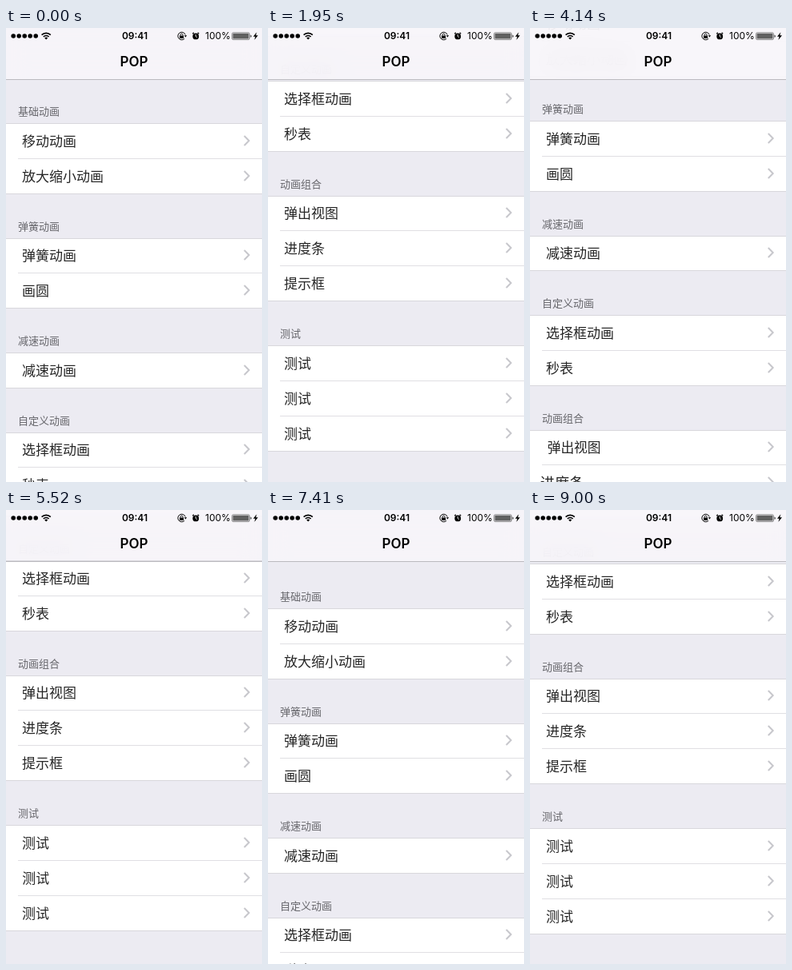
Animation, 320 px wide and 568 px high, one loop 9.03 s. Source, as an HTML page:

```html
<!DOCTYPE html>
<html lang="zh-CN">
<head>
<meta charset="utf-8">
<title>POP</title>
<style>
  html, body { margin: 0; width: 100%; height: 100%; overflow: hidden; background: #ecebf2; }
  #stage { position: relative; width: 320px; height: 568px; overflow: hidden; background: #ecebf2;
    font-family: "Noto Sans CJK SC DemiLight", "Noto Sans CJK SC Light", "Noto Sans CJK SC", "Noto Sans CJK", sans-serif; }
  #list { position: absolute; left: 0; top: 0; width: 320px; padding-top: 63.75px; }
  .head { position: relative; height: 55.5px; }
  .head span { position: absolute; left: 15px; bottom: 5.2px; font-size: 13px; line-height: 20px;
    font-weight: 350; color: #66666b; white-space: nowrap; }
  .group { position: relative; background: #fff; }
  .group::before { content: ""; position: absolute; z-index: 1; left: 0; top: 0; width: 100%;
    height: 1px; background: #d8d7dc; }
  .row { position: relative; height: 44px; }
  .row::after { content: ""; position: absolute; left: 15px; right: 0; top: 43.5px;
    height: 1px; background: #e0dfe3; }
  .row:last-child::after { left: 0; background: #d8d7dc; }
  .label { position: absolute; left: 20px; top: -.7px; width: 200px; font-size: 17px; line-height: 44px;
    font-weight: 350; color: #262626; white-space: nowrap; transform-origin: 50% 50%; }
  .row svg { position: absolute; left: 296px; top: 13.3px; }
  #bar { position: absolute; left: 0; top: 0; width: 320px; height: 64px; border-bottom: 1px solid #bbbabf;
    background: rgba(248, 246, 250, .9); -webkit-backdrop-filter: blur(14px); backdrop-filter: blur(14px); }
  #bar svg { position: absolute; left: 0; top: 0; }
  #bar text { font-family: Inter, Roboto, sans-serif; fill: #000; }
</style>
</head>
<body>
<div id="stage">
  <div id="list"></div>
  <div id="bar">
    <svg width="320" height="64" viewBox="0 0 320 64">
      <circle cx="9.2" cy="10" r="2.8"/><circle cx="16.2" cy="10" r="2.8"/><circle cx="23.2" cy="10" r="2.8"/>
      <circle cx="30.2" cy="10" r="2.8"/><circle cx="37.2" cy="10" r="2.8"/>
      <g fill="none" stroke="#000" stroke-width="1.7">
        <path d="M44.6 8.6a8 8 0 0 1 11.2 0"/>
        <path d="M46.8 11a5 5 0 0 1 6.8 0"/>
      </g>
      <path d="M48.2 12.5a3 3 0 0 1 4 0l-2 2.1z"/>
      <text x="161" y="14.3" font-size="12" font-weight="600" text-anchor="middle">09:41</text>
      <g fill="none" stroke="#000">
        <path d="M224.2 8.4A4.8 4.8 0 1 0 223 13.5"/>
        <path d="M218 9.6v-1a1.5 1.5 0 0 1 3 0v1" stroke-width=".9"/>
      </g>
      <path d="M217 9.4h5v3.5h-5zM222.6 9.2h3.6l-1.8 2.4z"/>
      <circle cx="237.2" cy="10.4" r="3.9"/>
      <path d="M233.2 7.2l1.6-1.4M241.2 7.2l-1.6-1.4" stroke="#000" stroke-width="1.2"/>
      <path d="M237.2 8v2.6l1.6 1" fill="none" stroke="#fff" stroke-width=".9"/>
      <text x="249" y="14.3" font-size="12">100%</text>
      <rect x="282.5" y="5.8" width="22" height="8.8" rx="1.6" fill="none" stroke="#777" stroke-width=".8"/>
      <rect x="283.5" y="6.8" width="20" height="6.8" rx=".6" fill="#606060"/>
      <path d="M305.4 8.6a1.6 1.6 0 0 1 0 3.2z" fill="#606060"/>
      <path d="M313.4 5.2l-4.4 5.6h2.6l-1.2 4.2 4.6-5.8h-2.7z"/>
      <text x="160" y="48.2" font-size="17" font-weight="600" text-anchor="middle">POP</text>
    </svg>
  </div>
</div>
<script>
const LOOP = 9030, STEP = 30, VIEW = 568, END = 438.5;
const sections = [
  ['基础动画', '移动动画', '放大缩小动画'],
  ['弹簧动画', '弹簧动画', '画圆'],
  ['减速动画', '减速动画'],
  ['自定义动画', '选择框动画', '秒表'],
  ['动画组合', '弹出视图', '进度条', '提示框'],
  ['测试', '测试', '测试', '测试']
];

// Each swipe: [seconds, scroll offset]; it ends at an edge and bounces there.
const swipes = [
  [[0, 0], [.35, 22], [.73, 81.5], [.87, 125.5], [.97, 169.5], [1.08, 236], [1.37, END]],
  [[2.1, END], [2.3, 400], [2.41, 351], [2.5, 307], [2.555, 207.5], [2.595, 163.5], [2.76, 8.5], [2.77, 0]],
  [[3.69, 0], [3.93, 81.5], [4.065, 125.5], [4.14, 146.5], [4.45, 205], [4.75, 250], [4.9, 300], [5.07, END]],
  [[5.97, END], [6.3, 380], [6.5, 300], [6.7, 206], [6.96, 0]],
  [[7.72, 0], [7.85, 90], [8, 260], [8.2, END]]
];

const slope = (a, b) => (b[1] - a[1]) / (b[0] - a[0]);

function tangent(pts, i) {
  if (i === 0) return 0;
  return slope(pts[i - 1], pts[Math.min(i + 1, pts.length - 1)]);
}

function scrollAt(t) {
  const pts = swipes.filter(s => s[0][0] <= t).pop();
  const last = pts.length - 1, age = t - pts[last][0];
  if (age >= 0) return pts[last][1] + tangent(pts, last) * age * Math.exp(-10 * age);
  let i = 0;
  while (pts[i + 1][0] <= t) i++;
  const [t0, y0] = pts[i], [t1, y1] = pts[i + 1];
  const h = t1 - t0, u = (t - t0) / h, v = 1 - u;
  return y0 * (1 + 2 * u) * v * v + y1 * (3 - 2 * u) * u * u
    + h * u * v * (tangent(pts, i) * v - tangent(pts, i + 1) * u);
}

// A label pops with an initial velocity whenever its row comes into view.
const pop = age => 1 + .113 * Math.exp(-5.54 * age) * Math.sin(17.65 * age);

const list = document.getElementById('list');
const rows = [];

function add(parent, cls, html = '') {
  const el = document.createElement('div');
  el.className = cls;
  el.innerHTML = html;
  return parent.appendChild(el);
}

const chevron = '<svg width="12" height="16"><path d="M1.8 2l5.9 6-5.9 6" fill="none" stroke="#c7c7cc" stroke-width="2"/></svg>';
let rowTop = 64;
for (const [title, ...names] of sections) {
  add(list, 'head', `<span>${title}</span>`);
  rowTop += 55.5;
  const group = add(list, 'group');
  for (const name of names) {
    const row = add(group, 'row', `<div class="label">${name}</div>${chevron}`);
    rows.push({ label: row.firstChild, top: rowTop, shown: [] });
    rowTop += 44;
  }
}

const visible = (row, y) => row.top - y < VIEW && row.top + 44 - y > 0;
for (const row of rows) {
  let was = visible(row, 0);
  for (let ms = 0; ms < LOOP; ms += 5) {
    const now = visible(row, scrollAt(ms / 1000));
    if (now && !was) row.shown.push(ms / 1000);
    was = now;
  }
}

function draw() {
  const t = Math.floor(performance.now() % LOOP / STEP) * STEP / 1000;
  list.style.top = -Math.round(scrollAt(t) * 2) / 2 + 'px';
  for (const { label, shown } of rows) {
    const start = shown.filter(s => s <= t).pop();
    const scale = start === undefined ? 1 : pop(t - start);
    label.style.transform = Math.abs(scale - 1) < .002 ? 'none' : `scale(${scale})`;
  }
  requestAnimationFrame(draw);
}
draw();
</script>
</body>
</html>
```
